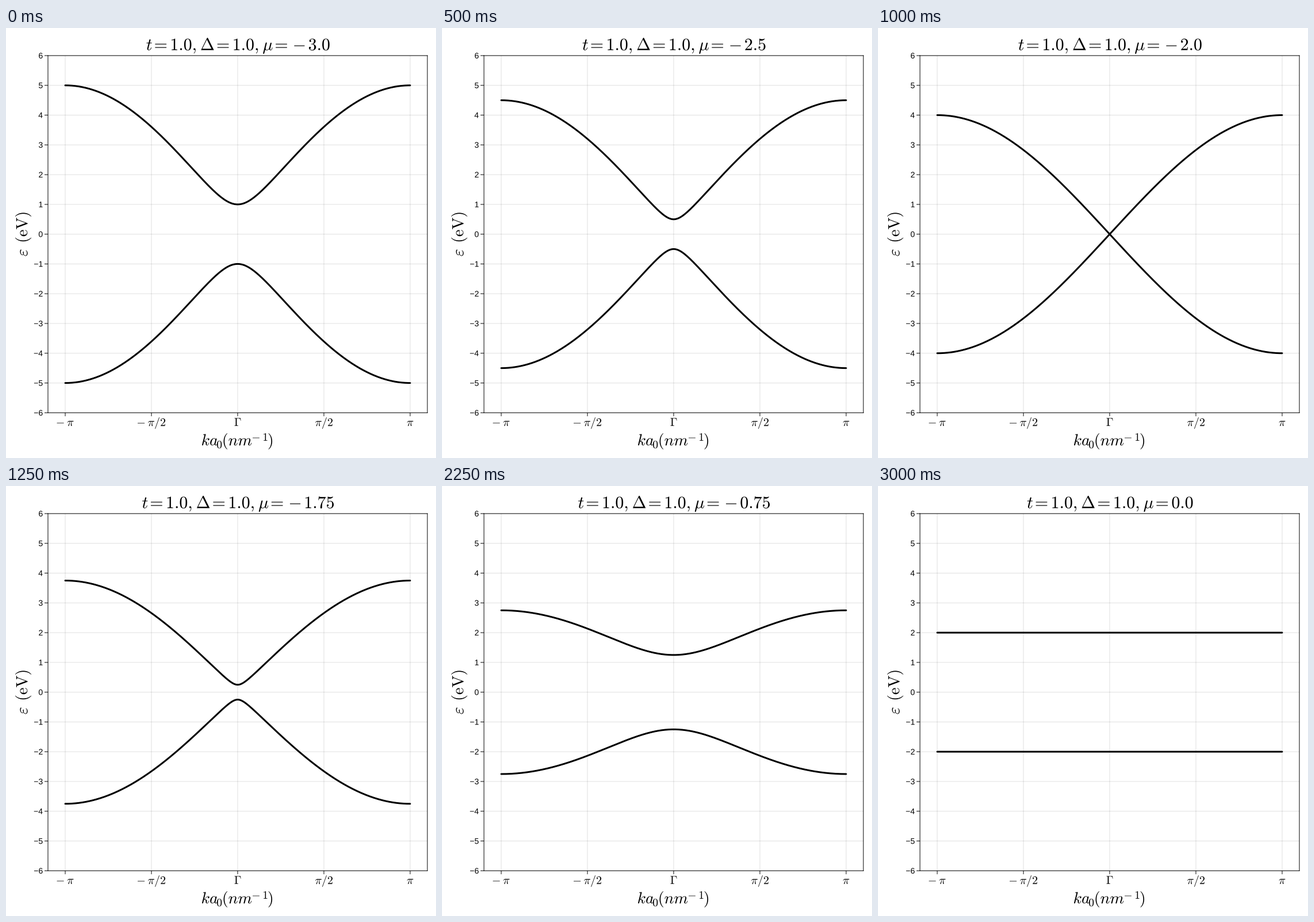
Recreate the animation shown at these times as a matplotlib script. Size 748 by 748 pixels, loop 3250 ms.

```python
import matplotlib.pyplot as plt
import numpy as np
from matplotlib.animation import FuncAnimation
from matplotlib.patches import PathPatch
from matplotlib.textpath import TextPath
from matplotlib.transforms import Affine2D

SIZE = 748
DPI = 64
PX = 72 / DPI  # points per pixel
FRAMES, INTERVAL = 13, 250
HOP, GAP = 1.0, 1.0
LEFT, RIGHT, TOP, BOTTOM = 73, 733, 48, 669.3
TICK = 6

plt.rcParams["mathtext.fontset"] = "cm"


def gap(em):
    """Horizontal math space; mathtext counts in widths of an italic m."""
    return r"\hspace{%.3f}" % (em / 0.878)


def outline(s, x, y, size, align=0.5, angle=0):
    """Text as a path in pixels, its ink aligned at x on baseline y."""
    path = TextPath((0, 0), s, size=size, prop={"family": "Liberation Sans"})
    box = path.get_extents()
    shift = box.x0 + align * box.width
    move = Affine2D().translate(-shift, 0).rotate_deg(angle)
    return move.translate(x, SIZE - y).transform_path(path)


def write(*args, **kwargs):
    patch = PathPatch(outline(*args, **kwargs), fc="black", lw=0, snap=False)
    return page.add_patch(patch)


def rule(x0, y0, x1, y1):
    page.plot([x0, x1], [SIZE - y0, SIZE - y1], color="black", lw=PX,
              solid_capstyle="butt", snap=False)


def title_text(mu):
    # tighten the automatic spacing around relations
    eq = gap(-0.076) + "=" + gap(-0.026)
    sign = gap(0.12) + "{-}" + gap(0.12) if mu < 0 else ""
    comma = "," + gap(0.025)
    return (
        rf"$t{eq}{HOP}{comma}\Delta{eq}{GAP}{comma}"
        rf"\mu{eq}{sign}{abs(mu)}$"
    )


def title_path(mu):
    return outline(title_text(mu), 403.6, 38.6, 30)


fig = plt.figure(figsize=(SIZE / DPI, SIZE / DPI), dpi=DPI, facecolor="white")
ax = fig.add_axes([LEFT / SIZE, 1 - BOTTOM / SIZE,
                   (RIGHT - LEFT) / SIZE, (BOTTOM - TOP) / SIZE])
page = fig.add_axes([0, 0, 1, 1])
page.axis("off")

ax.set_xlim(-1.1 * np.pi, 1.1 * np.pi)
ax.set_ylim(-6, 6)
ax.set_xticks(np.linspace(-np.pi, np.pi, 5))
ax.set_yticks(range(-6, 7))
ax.set_axisbelow(True)
ax.grid(color="black", alpha=0.12, lw=PX)
ax.tick_params(length=0, labelbottom=False, labelleft=False)
for line in ax.get_xgridlines() + ax.get_ygridlines():
    line.set_snap(False)
for spine in ax.spines.values():
    spine.set(linewidth=PX, color="black", snap=False)

for n in range(-6, 7):
    y = (TOP + BOTTOM) / 2 - n * (BOTTOM - TOP) / 12
    rule(LEFT - TICK, y, LEFT, y)
    write(str(n).replace("-", "\u2212"), 63.6, y + 4.9, 14, align=1)

minus = "{-}" + gap(0.19)
labels = [minus + r"\pi", minus + r"\pi/2", r"\Gamma", r"\pi/2", r"\pi"]
for i, label in enumerate(labels):
    x = 103 + 150 * i
    rule(x, BOTTOM, x, BOTTOM + TICK)
    write(f"${label}$", x, 692.3, 20)

# x label, with its scripts set apart
write("$ka$", 341, 726, 28, align=0)
write("$0$", 367, 731, 19.6, align=0)
write("$(nm$", 378.5, 726, 28, align=0)
write(f"${minus}1$", 429, 718, 19.6, align=0)
write("$)$", 456.5, 726, 28, align=0)

write(rf"$\varepsilon{gap(0.37)}\mathrm{{(eV)}}$", 37, 359, 28, angle=90)

k = np.linspace(-np.pi, np.pi, 401)
style = dict(color="black", lw=3 * PX, solid_capstyle="round",
             solid_joinstyle="round", zorder=3, snap=False)
upper, = ax.plot(k, 0 * k, **style)
lower, = ax.plot(k, 0 * k, **style)
title = page.add_patch(PathPatch(title_path(-3.0), fc="black", lw=0,
                                 snap=False))
page.set(xlim=(0, SIZE), ylim=(0, SIZE))


def update(i):
    mu = -3 + 0.25 * i
    energy = np.hypot(2 * HOP * np.cos(k) + mu, 2 * GAP * np.sin(k))
    upper.set_ydata(energy)
    lower.set_ydata(-energy)
    title.set_path(title_path(mu))
    return upper, lower, title


anim = FuncAnimation(fig, update, frames=FRAMES, interval=INTERVAL,
                     repeat=True, repeat_delay=0)
plt.show()
```
